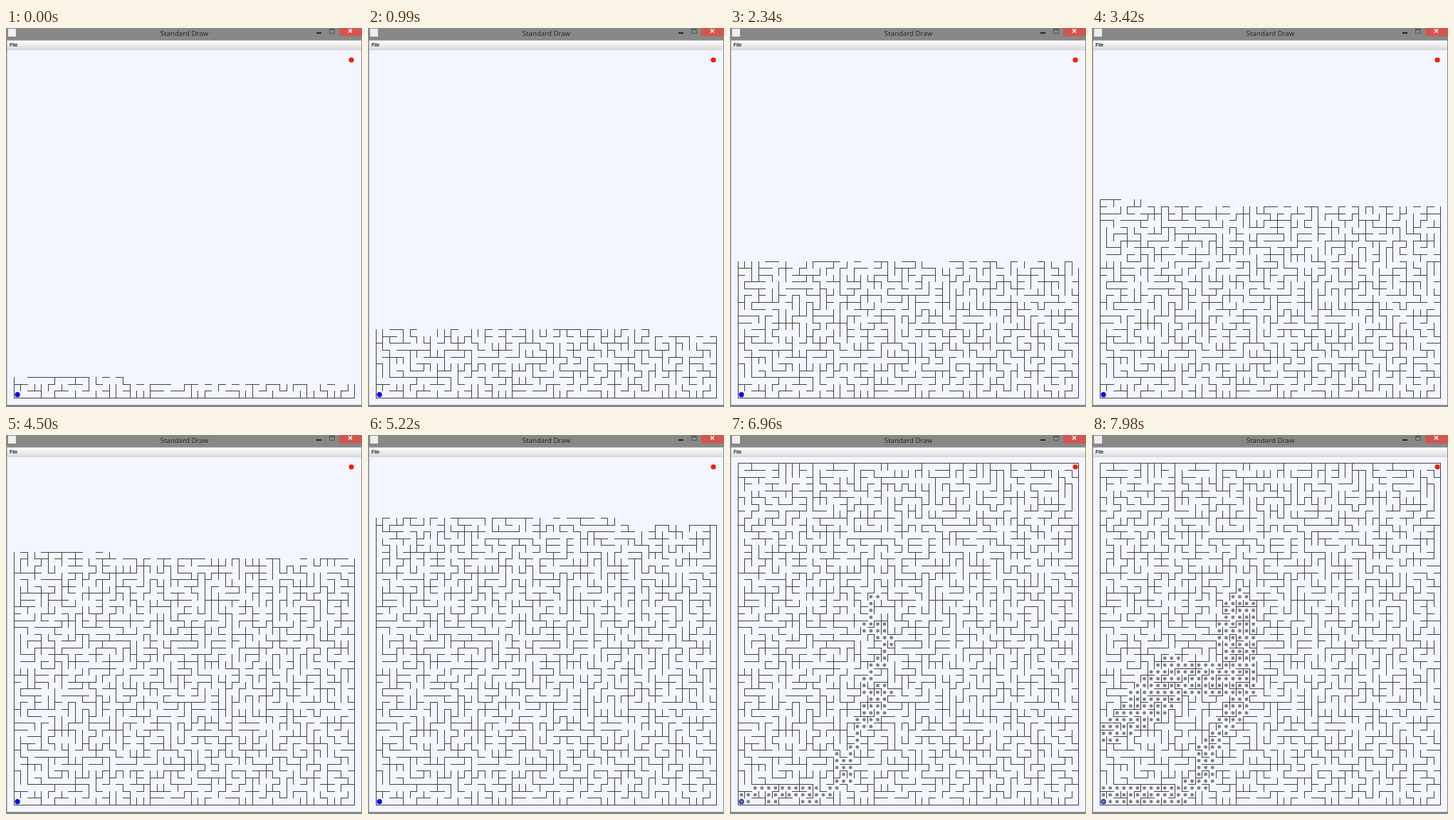
Animation, 500 px wide and 531 px high, one loop 8 s. Source, as an HTML page with a canvas:

```html
<!DOCTYPE html>
<html lang="en">
<head>
<meta charset="utf-8">
<title>Maze</title>
<style>
  html, body { margin: 0; width: 100%; height: 100%; overflow: hidden; background: #888; }
  svg, canvas { position: absolute; left: 0; top: 0; }
</style>
</head>
<body>
<svg width="500" height="531">
  <defs>
    <linearGradient id="menu" x2="0" y2="1">
      <stop stop-color="#fff"/><stop offset="1" stop-color="#dadada"/>
    </linearGradient>
  </defs>
  <rect width="500" height="531" fill="#888"/>
  <rect x="3" y="1" width="11" height="11" fill="#eee"/>
  <text x="250.5" y="11" font-family="'Open Sans', sans-serif" font-size="9.7" text-anchor="middle" fill="#222">Standard Draw</text>
  <rect x="436" y="6" width="7" height="2" fill="#222"/>
  <path d="M454.5 1.5h7v6h-7zM454 2.5h8" fill="none" stroke="#555"/>
  <rect x="468" width="32" height="11.5" fill="#d0574f"/>
  <path d="M481 1.5l5 5m0-5l-5 5" stroke="#fff" stroke-width="1.4"/>
  <rect x="1.5" y="17.5" width="497.5" height="13" fill="url(#menu)"/>
  <text x="5" y="26" font-family="'Liberation Sans', sans-serif" font-size="6.5" font-weight="bold" fill="#222">File</text>
  <rect x="1.5" y="30.5" width="497.5" height="497.5" fill="#f3f6ff"/>
</svg>
<canvas id="stage" width="500" height="531"></canvas>
<script>
const N = 50, STEP = 9.571, LEFT = 10.8, BOTTOM = 518;
const LOOP = 8000, TICK = 30, SOLVE_START = 6360, SOLVE_END = 7980;
const FIRST_CELLS = 117, CELLS_PER_MS = 0.377;
const ctx = document.getElementById('stage').getContext('2d');

// The searched area is a thick trail with a branch; points are [column, row, radius].
const TRAILS = [
  [[1, 1, 1.5], [11, 1, 1.5], [15, 3, 1.2], [15, 7, 1.5], [17, 10, 1], [20, 14, 1.8], [20, 18, 2.3], [19.5, 25, 2.9], [20, 29, 2.2]],
  [[20, 18, 1.5], [10, 18, 3.2], [6, 14, 2.9], [1, 10, 1.7]]
];
const searched = new Set();

function markSearched() {
  const samples = 30;
  for (const trail of TRAILS) {
    for (let k = 1; k < trail.length; k++) {
      for (let s = 0; s <= samples; s++) {
        const [col, row, radius] = trail[k].map((v, j) => trail[k - 1][j] + (v - trail[k - 1][j]) * s / samples);
        for (let i = 0; i < N * N; i++)
          if (Math.hypot(i % N - col, Math.floor(i / N) - row) <= radius) searched.add(i);
      }
    }
  }
}

let seed = 20;
function random() {
  seed = (seed * 1664525 + 1013904223) % 4294967296;
  return seed / 4294967296;
}

// Kruskal's algorithm, joining the searched area before the rest.
const openEast = [], openNorth = [];
function carve() {
  const edges = [];
  const addEdge = (a, b) => {
    const inside = searched.has(a) && searched.has(b);
    edges.push({ a, b, rank: random() + (inside ? 0 : 1) });
  };
  for (let i = 0; i < N * N; i++) {
    if (i % N < N - 1) addEdge(i, i + 1);
    if (i + N < N * N) addEdge(i, i + N);
  }
  edges.sort((p, q) => p.rank - q.rank);
  const parent = Array.from({ length: N * N }, (_, i) => i);
  const find = i => {
    while (parent[i] !== i) i = parent[i] = parent[parent[i]];
    return i;
  };
  for (const { a, b } of edges) {
    const rootA = find(a), rootB = find(b);
    if (rootA === rootB) continue;
    parent[rootA] = rootB;
    (b === a + 1 ? openEast : openNorth)[a] = true;
  }
}

// Depth-first search: north, east, south, west.
const visits = [], seen = new Set();
function explore(i) {
  if (!searched.has(i) || seen.has(i)) return;
  seen.add(i);
  visits.push(i);
  if (openNorth[i]) explore(i + N);
  if (openEast[i]) explore(i + 1);
  if (openNorth[i - N]) explore(i - N);
  if (i % N && openEast[i - 1]) explore(i - 1);
}

const gridX = col => Math.round(LEFT + col * STEP);
const gridY = row => Math.round(BOTTOM - row * STEP);

function drawWalls(i) {
  const col = i % N, row = Math.floor(i / N);
  const x0 = gridX(col), x1 = gridX(col + 1), y0 = gridY(row), y1 = gridY(row + 1);
  const across = y => ctx.fillRect(x0, y, x1 - x0 + 1, 1);
  const upright = x => ctx.fillRect(x, y1, 1, y0 - y1 + 1);
  if (!openNorth[i - N]) across(y0);
  if (!openNorth[i]) across(y1);
  if (!col || !openEast[i - 1]) upright(x0);
  if (!openEast[i]) upright(x1);
}

function dot(i, radius, color) {
  ctx.fillStyle = color;
  ctx.beginPath();
  ctx.arc(LEFT + 0.5 + (i % N + 0.5) * STEP, BOTTOM + 0.5 - (Math.floor(i / N) + 0.5) * STEP, radius, 0, 7);
  ctx.fill();
}

function render(now) {
  const t = Math.floor(now % LOOP / TICK) * TICK;
  ctx.clearRect(0, 0, 500, 531);
  dot(N * N - 1, 3.6, '#fa1c00');
  dot(0, 3.6, '#0610ee');
  ctx.fillStyle = '#45433e';
  const count = Math.min(N * N, Math.round(FIRST_CELLS + t * CELLS_PER_MS));
  for (let i = 0; i < count; i++) drawWalls(i);
  const progress = Math.max(0, (t - SOLVE_START) / (SOLVE_END - SOLVE_START));
  visits.slice(0, Math.round(progress * visits.length)).forEach(i => dot(i, 2.4, '#808080'));
}

markSearched();
carve();
explore(0);
const start = performance.now();
function loop() {
  render(performance.now() - start);
  requestAnimationFrame(loop);
}
loop();
</script>
</body>
</html>
```
